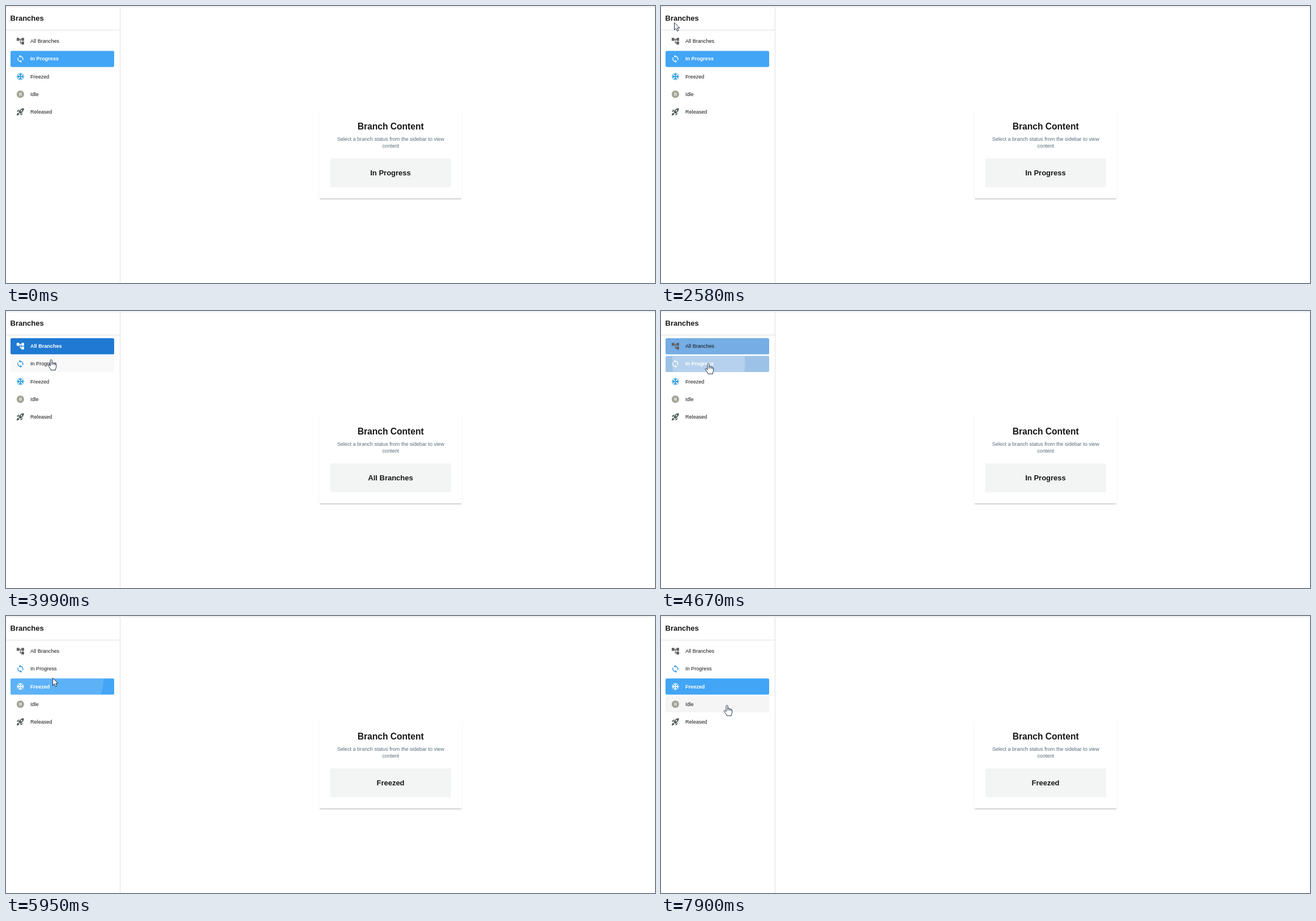
Write an HTML page with a canvas that moves like this. It is 1146 by 489 pixels and loops after 8 s.

```html
<!DOCTYPE html>
<html lang="en">
<head>
<meta charset="utf-8">
<title>Branches</title>
<style>
html, body { margin: 0; width: 100%; height: 100%; overflow: hidden; background: #fff; }
canvas { display: block; }
</style>
</head>
<body>
<canvas width="1146" height="489"></canvas>
<script>
const ctx = document.querySelector('canvas').getContext('2d');
const LOOP = 8000, FADE = 150, RIPPLE = 550;
const LEFT = 8, WIDTH = 183, ROW_HEIGHT = 28.5, ROW_GAP = 31.15;
const rowTop = i => 48 + i * ROW_GAP;

const rows = [
  { label: 'All Branches', tint: '#616161', main: [25, 118, 210], dark: [25, 114, 205],
    icon: 'M22 11V3h-7v3H9V3H2v8h7V8h2v10h4v3h7v-8h-7v3h-2V8h2v3z' },
  { label: 'In Progress', tint: '#2a8fdc', main: [66, 165, 245], dark: [25, 118, 210],
    icon: 'M12 4V1L8 5l4 4V6c3.31 0 6 2.69 6 6 0 1.01-.25 1.97-.7 2.8l1.46 1.46C19.54 15.03 20 13.57 20 12c0-4.42-3.58-8-8-8zm0 14c-3.31 0-6-2.69-6-6 0-1.01.25-1.97.7-2.8L5.24 7.74C4.46 8.97 4 10.43 4 12c0 4.42 3.58 8 8 8v3l4-4-4-4v3z' },
  { label: 'Freezed', tint: '#1c96dc', main: [66, 165, 245], dark: [25, 118, 210],
    icon: 'M22 11h-4.17l3.24-3.24-1.41-1.42L15 11h-2V9l4.66-4.66-1.42-1.41L13 6.17V2h-2v4.17L7.76 2.93 6.34 4.34 11 9v2H9L4.34 6.34 2.93 7.76 6.17 11H2v2h4.17l-3.24 3.24 1.41 1.42L9 13h2v2l-4.66 4.66 1.42 1.41L11 17.83V22h2v-4.17l3.24 3.24 1.42-1.41L13 15v-2h2l4.66 4.66 1.41-1.42L17.83 13H22z' },
  { label: 'Idle', tint: '#a2a395',
    icon: 'M12 2C6.48 2 2 6.48 2 12s4.48 10 10 10 10-4.48 10-10S17.52 2 12 2zm-1 14H9V8h2v8zm4 0h-2V8h2v8z' },
  { label: 'Released', tint: '#555c5c',
    icon: 'M9.19 6.35c-2.04 2.29-3.44 5.58-3.57 5.89L2 10.69l4.05-4.05c.47-.47 1.15-.68 1.81-.55zM11.17 17s3.74-1.55 5.89-3.7c5.4-5.4 4.5-9.62 4.21-10.57-.95-.3-5.17-1.19-10.57 4.21C8.55 9.09 7 12.83 7 12.83zm6.48-2.19c-2.29 2.04-5.58 3.44-5.89 3.57L13.31 22l4.05-4.05c.47-.47.68-1.15.55-1.81zM9 18c0 .83-.34 1.58-.88 2.12C6.94 21.3 2 22 2 22s.7-4.94 1.88-6.12C4.42 15.34 5.17 15 6 15c1.66 0 3 1.34 3 3m4-9c0-1.1.9-2 2-2s2 .9 2 2-.9 2-2 2-2-.9-2-2' }
];
for (const row of rows) row.path = new Path2D(row.icon);

const arrow = new Path2D('M.5.5V13.6L3.5 10.8 5.6 15.5 7.8 14.5 5.8 9.9H9.9Z');
const hand = new Path2D('M-2 2C-2 0 1 0 1 2V6.5C1.3 5.4 3.8 5.6 3.9 7.2C4.5 6.3 6.4 6.7 6.4 8.2C7 7.4 8.6 7.8 8.6 9.5V13C8.6 15 7.2 16 7.2 19H-.8C-1.5 16.5-4.5 13-5.6 11.5C-6.4 10-4.6 9.2-3.5 10.2L-2 11.8Z');

// Bursts of screen updates: start, end, number of steps.
const bursts = [
  [530, 730, 4], [930, 1140, 4], [1410, 1760, 6], [1890, 2170, 5], [2240, 2990, 12],
  [3070, 3270, 4], [3460, 4130, 11], [4460, 5220, 12], [5290, 5290, 1],
  [5630, 6410, 13], [6470, 7030, 9], [7290, 7900, 10]
];

// Pointer path: time, x, y.
const trail = [
  [530, 989, 449], [730, 649, 413], [865, 649, 413], [1140, 424, 159], [1340, 424, 159],
  [1760, 179, 69], [1830, 179, 69], [2170, 24, 32], [2450, 10, 22], [2990, 64, 50],
  [3270, 65, 61], [3680, 65, 61], [3990, 80, 85], [4130, 84, 92], [4930, 84, 92],
  [5220, 83, 105], [5290, 82, 109], [6200, 82, 109], [6340, 714, 367], [6410, 714, 367],
  [6700, 851, 345], [7030, 667, 295], [7220, 667, 295], [7620, 150, 165], [7900, 117, 157]
];

const clicks = [
  { row: 0, down: 3460 }, { row: 1, down: 4460 }, { row: 2, down: 5630 }
];
const HOLD = 150;

function snap(t) {
  const burst = bursts.findLast(b => b[0] <= t);
  if (!burst) return 0;
  const [start, end, steps] = burst;
  if (t >= end) return end;
  const step = (end - start) / (steps - 1);
  return start + Math.floor((t - start) / step + .15) * step;
}

function pointer(t) {
  const next = trail.findIndex(p => p[0] > t);
  if (next === 0) return null;
  if (next < 0) return trail.at(-1).slice(1);
  const a = trail[next - 1], b = trail[next], p = (t - a[0]) / (b[0] - a[0]);
  return [a[1] + (b[1] - a[1]) * p, a[2] + (b[2] - a[2]) * p];
}

function hovered(t) {
  const p = pointer(t);
  if (!p || p[0] < LEFT || p[0] > LEFT + WIDTH) return -1;
  return rows.findIndex((_, i) => p[1] >= rowTop(i) && p[1] < rowTop(i) + ROW_HEIGHT);
}

const selected = t => clicks.findLast(c => t >= c.down + HOLD)?.row ?? 1;
const easeOut = p => 1 - (1 - Math.min(1, Math.max(0, p))) ** 1.9;

function targetColor(i, t) {
  const over = hovered(t) === i;
  if (selected(t) === i) return over ? rows[i].dark : rows[i].main;
  return over ? [245, 245, 245] : [255, 255, 255];
}

// A linear colour transition equals the mean target over its duration.
function rowColor(i, t) {
  const samples = 10, sum = [0, 0, 0];
  for (let k = 0; k < samples; k++)
    targetColor(i, t - k * FADE / samples).forEach((v, c) => sum[c] += v / samples);
  return `rgb(${sum.map(Math.round)})`;
}

function text(str, x, y, size, color = '#161616', weight = 'normal', align = 'left') {
  ctx.font = `${weight} ${size}px "Liberation Sans", Arial, sans-serif`;
  ctx.textAlign = align;
  ctx.fillStyle = color;
  ctx.fillText(str, x, y);
}

function box(x, y, w, h, color) {
  ctx.beginPath();
  ctx.roundRect(x, y, w, h, 2.6);
  ctx.fillStyle = color;
  ctx.fill();
}

function disc(x, y, r, color) {
  ctx.beginPath();
  ctx.arc(x, y, r, 0, 7);
  ctx.fillStyle = color;
  ctx.fill();
}

function drawRow(row, i, t) {
  const top = rowTop(i), active = selected(t) === i;
  ctx.save();
  box(LEFT, top, WIDTH, ROW_HEIGHT, rowColor(i, t));
  ctx.clip();
  for (const { row: target, down } of clicks) {
    if (target !== i || t < down || t > down + HOLD + RIPPLE) continue;
    const [x, y] = pointer(down);
    const alpha = .3 * (1 - easeOut((t - down - HOLD) / RIPPLE));
    const tone = active ? '255,255,255' : '0,0,0';
    disc(x, y, (LEFT + WIDTH - x + 2) * easeOut((t - down) / RIPPLE), `rgba(${tone},${alpha})`);
  }
  ctx.restore();

  ctx.save();
  ctx.translate(17.6, top + 6.4);
  ctx.scale(.65, .65);
  ctx.fillStyle = active ? '#fff' : row.tint;
  ctx.fill(row.path);
  ctx.restore();
  text(row.label, 43, top + 17.3, 9.1, active ? '#fff' : '#161616', active ? 'bold' : 'normal');
}

function drawCard(label) {
  ctx.save();
  for (const [dy, blur, alpha, inset] of [[1.3, .65, .2, .65], [.65, .65, .14, 0], [.65, 2, .12, 0]]) {
    ctx.shadowColor = `rgba(0,0,0,${alpha})`;
    ctx.shadowBlur = blur;
    ctx.shadowOffsetY = dy;
    box(552.5 + inset, 182 + inset, 253 - 2 * inset, 158 - 2 * inset, '#fff');
  }
  ctx.restore();
  box(552.5, 182, 253, 158, '#fff');
  text('Branch Content', 679.2, 217.5, 15.6, '#161616', 'bold', 'center');
  text('Select a branch status from the sidebar to view', 679.2, 237.6, 9.1, '#546e7a', 'normal', 'center');
  text('content', 679.2, 250.4, 9.1, '#546e7a', 'normal', 'center');
  box(572.5, 269, 213.5, 51, '#f3f5f5');
  text(label, 679, 298.7, 13, '#161616', 'bold', 'center');
}

function drawPointer(t) {
  const p = pointer(t);
  if (!p) return;
  if (clicks.some(c => t >= c.down && t < c.down + 200))
    disc(p[0] - 1, p[1] + 2, 10, 'rgba(248,238,30,.78)');
  const shape = hovered(t) < 0 ? arrow : hand;
  ctx.save();
  ctx.translate(...p);
  ctx.fillStyle = '#fff';
  ctx.strokeStyle = '#1c2a40';
  ctx.lineWidth = 1;
  ctx.fill(shape);
  ctx.stroke(shape);
  if (shape === hand) ctx.stroke(new Path2D('M1 6V10M3.9 7V10M6.4 8V10.5'));
  ctx.restore();
}

function draw(now) {
  const t = snap(now % LOOP);
  ctx.fillStyle = '#fff';
  ctx.fillRect(0, 0, 1146, 489);
  ctx.fillStyle = '#e0e0e0';
  ctx.fillRect(0, 1, 1146, 1);
  ctx.fillRect(0, 42, 201, 1);
  ctx.fillRect(201, 1, 1, 488);
  text('Branches', 7.5, 26.2, 13, '#161616', 'bold');
  rows.forEach((row, i) => drawRow(row, i, t));
  drawCard(rows[selected(t)].label);
  drawPointer(t);
}

const start = performance.now();
function tick() {
  draw(performance.now() - start);
  requestAnimationFrame(tick);
}
tick();
</script>
</body>
</html>
```
